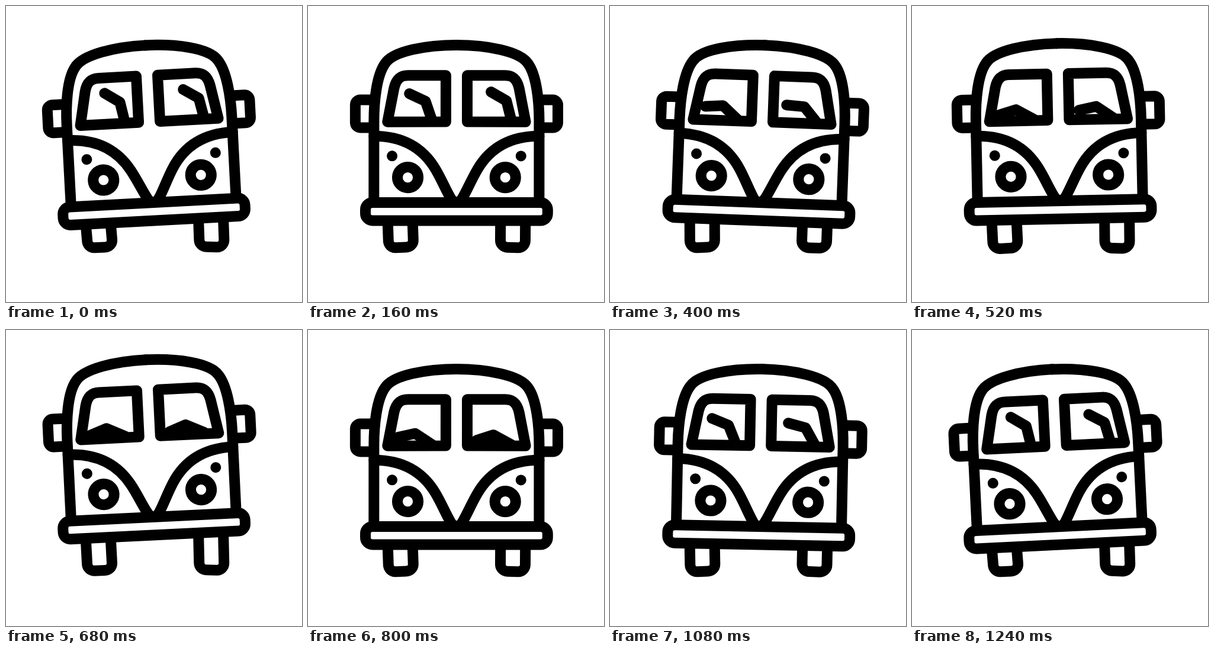
An HTML page for the animation above (1.28 s loop, 500 px wide and 500 px high).

```html
<!DOCTYPE html>
<html lang="en">
<head>
<meta charset="utf-8">
<title>Camper van</title>
<style>
  html, body { margin: 0; width: 100%; height: 100%; overflow: hidden; background: #fff; }
  svg { display: block; width: 100vw; height: 100vh; }
  .line { fill: none; stroke: #000; stroke-width: 18; stroke-linecap: round; stroke-linejoin: round; }
  .leg { stroke-linecap: butt; }
</style>
</head>
<body>
<svg viewBox="0 0 500 500">
  <defs>
    <g id="half">
      <path d="M111.3 332V195C111.3 162 115.5 117 130.3 97C144 76 200 66 251.5 66"/>
      <path d="M111.3 219.8C155 219.8 192 236 215.5 276C225.5 293 232 309 239.5 322C243 329 247 331.5 251 331.5"/>
      <path d="M111 158.5H88.3a8.5 8.5 0 0 0-8.5 8.5V197a8.5 8.5 0 0 0 8.5 8.5H111"/>
      <path d="M134.2 195.7L145.2 139C149 122 157 117.3 169 117.3H232.8V195.6Z"/>
      <circle cx="168.5" cy="289.6" r="17.6"/>
      <circle cx="142" cy="253.4" r="9" fill="#000" stroke="none"/>
    </g>
    <path id="wiper" d="M177.8 143.2L203 159.7L209.5 193.5"/>
  </defs>
  <path class="line leg" id="legL"/>
  <path class="line leg" id="legR"/>
  <g class="line" id="body">
    <use href="#half"/>
    <use href="#half" transform="translate(501.7 0) scale(-1 1)"/>
    <use href="#wiper" id="wipeL"/>
    <g transform="translate(134 0)"><use href="#wiper" id="wipeR"/></g>
    <rect x="97" y="332" width="307.8" height="30.5" rx="12" fill="#fff"/>
  </g>
</svg>
<script>
  const LOOP = 1280, SWAY = 640, HOP_HALF = 160, WIPE_LAG = 60;
  const PIVOT = { x: 251, y: 363 };
  const TAU = Math.PI * 2;
  const el = id => document.getElementById(id);
  const [body, legL, legR, wipeL, wipeR] =
    ['body', 'legL', 'legR', 'wipeL', 'wipeR'].map(el);

  // Place a point of the body on the stage
  function onBody(x, y, deg, hop) {
    const a = deg * Math.PI / 180, dx = x - PIVOT.x, dy = y - PIVOT.y;
    return [
      PIVOT.x + dx * Math.cos(a) - dy * Math.sin(a),
      PIVOT.y + dx * Math.sin(a) + dy * Math.cos(a) - hop
    ];
  }

  // A leg hangs from the body while its foot stays near the ground
  function legPath(topX, footX, footY, tilt, deg, hop) {
    const w = 21, r = 12;
    const a = onBody(topX - w, 362, deg, hop), b = onBody(topX + w, 362, deg, hop);
    const l = footX - w, rt = footX + w, yl = footY - tilt, yr = footY + tilt;
    return `M${a}L${l} ${yl - r}A${r} ${r} 0 0 0 ${l + r} ${yl}` +
           `L${rt - r} ${yr}A${r} ${r} 0 0 0 ${rt} ${yr - r}L${b}`;
  }

  function wipe(node, t) {
    const deg = -27 * (1 - Math.cos(TAU * t / LOOP));
    node.setAttribute('transform', `rotate(${deg} 209.5 193.5)`);
  }

  function draw(ms) {
    const t = ms % LOOP;
    const deg = -3 * Math.cos(TAU * t / SWAY);
    const d = (t - SWAY) / HOP_HALF;
    const air = Math.abs(d) < 1;
    const hop = air ? 9.5 * (1 + Math.cos(Math.PI * d)) : 0;
    const dip = air ? -2.2 * Math.sin(Math.PI * d) : 0;

    body.setAttribute('transform',
      `translate(0 ${-hop}) rotate(${deg} ${PIVOT.x} ${PIVOT.y})`);
    wipe(wipeL, t);
    wipe(wipeR, t - WIPE_LAG);

    const slide = -0.45 * deg;
    legL.setAttribute('d', legPath(155.6, 156.8 + slide, 407.9 + dip, -0.4, deg, hop));
    legR.setAttribute('d', legPath(346.2, 346 + slide, 408 + 0.33 * deg + dip, 0.3, deg, hop));
  }

  const start = performance.now();
  function tick() {
    draw(performance.now() - start);
    requestAnimationFrame(tick);
  }
  tick();
</script>
</body>
</html>
```
